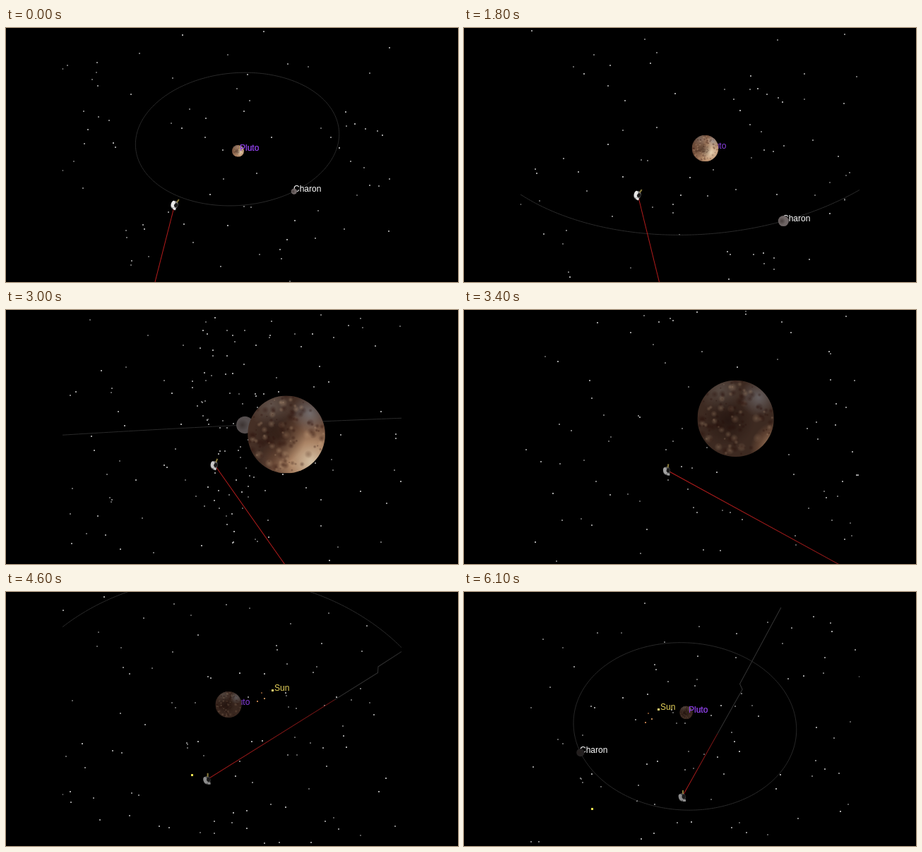
Write an HTML page with a canvas that moves like this. It is 640x360 px and loops after 6200 ms.

```html
<!DOCTYPE html>
<html lang="en">
<head>
<meta charset="utf-8">
<title>Pluto flyby</title>
<style>
html, body { margin: 0; width: 100%; height: 100%; overflow: hidden; background: #000; }
canvas { display: block; }
</style>
</head>
<body>
<canvas id="stage" width="640" height="360"></canvas>
<script>
const ctx = document.getElementById('stage').getContext('2d');
const LOOP = 6200, STEP = 100, TAU = Math.PI * 2;
const WIDTH = 640, HEIGHT = 360, LEFT = 80, RIGHT = 560, FOCAL = 620;

// Space: Pluto sits at the origin with radius 1, the orbit lies in the plane z = 0
const ORBIT_RADIUS = 16.6, CHARON_RADIUS = .55;
const CHARON = [ORBIT_RADIUS, -.33, 0];
const PASS_TIME = 3, PASS_POINT = [-11.2, 2, .5], VELOCITY = [11.4, 11.4, 15.6];
const AIM = [.15, 1.4, 0], UP = [.03, -.05, 1];
const SUN = [-.313, -.602, -.737];

const dot = (a, b) => a[0] * b[0] + a[1] * b[1] + a[2] * b[2];
const add = (a, b, k = 1) => a.map((v, i) => v + b[i] * k);
const unit = a => a.map(v => v / Math.hypot(...a));
const cross = (a, b) => [
  a[1] * b[2] - a[2] * b[1], a[2] * b[0] - a[0] * b[2], a[0] * b[1] - a[1] * b[0]
];

function randomizer(seed) {
  return () => (seed = (seed * 16807) % 2147483647) / 2147483647;
}
const random = randomizer(4242);
const spread = () => random() + random() + random() - 1.5;

function makeStar(direction) {
  return { direction, color: gray(85 + random() * 85) };
}
const stars = [
  ...Array.from({ length: 2800 }, () => {
    const z = random() * 2 - 1, a = random() * TAU, s = Math.sqrt(1 - z * z);
    return makeStar([s * Math.cos(a), s * Math.sin(a), z]);
  }),
  // A dense band behind the closest approach
  ...Array.from({ length: 65 }, () => makeStar(unit([1, -.04 + spread() * .1, -.04 + spread() * .3])))
];

const speckles = Array.from({ length: 130 }, (_, i) => {
  const angle = random() * TAU, reach = Math.sqrt(random());
  return {
    x: Math.cos(angle) * reach, y: Math.sin(angle) * reach,
    r: .025 + random() * .1,
    color: i % 3 ? [45, 14, 8, .4] : [235, 195, 155, .3]
  };
});

function gray(value, tint = 1) {
  return `rgb(${Math.round(value)},${Math.round(value * tint)},${Math.round(value * tint)})`;
}

// Straight flight past Pluto, always looking at the same point
function cameraAt(t) {
  const eye = add(PASS_POINT, VELOCITY, t - PASS_TIME);
  const forward = unit(add(AIM, eye, -1));
  const right = unit(cross(forward, UP)), up = cross(right, forward);
  const look = v => {
    const depth = dot(v, forward), scale = FOCAL / depth;
    return { x: WIDTH / 2 + dot(v, right) * scale, y: HEIGHT / 2 - dot(v, up) * scale, depth, scale };
  };
  return {
    toDirection: look,
    toPoint: p => look(add(p, eye, -1)),
    light: { x: dot(SUN, right), y: -dot(SUN, up), z: -dot(SUN, forward) }
  };
}

// Smooth curve through evenly handled [time, value] keys
function curve(keys, t) {
  const last = keys.length - 1;
  let i = 0;
  while (i < last - 1 && t >= keys[i + 1][0]) i++;
  const slope = k => {
    const a = keys[Math.max(k - 1, 0)], b = keys[Math.min(k + 1, last)];
    return (b[1] - a[1]) / (b[0] - a[0]);
  };
  const h = keys[i + 1][0] - keys[i][0], u = (t - keys[i][0]) / h, v = 1 - u;
  return v * v * (1 + 2 * u) * keys[i][1] + u * u * (1 + 2 * v) * keys[i + 1][1]
    + h * u * v * (v * slope(i) - u * slope(i + 1));
}
const craftX = [[0, 239], [1, 240], [1.8, 246], [3, 295], [3.9, 273], [5.3, 301], [6.1, 309]];
const craftY = [[0, 250], [1.8, 236], [3, 219], [3.9, 244], [5.3, 285], [6.1, 290]];
const pathAngle = [[0, 1.82], [1.8, 1.33], [3, .957], [3.9, -.12], [5.3, -.87], [6.1, -1.06]];

function pixel(p, color, size = 2) {
  if (p.depth < 0) return;
  ctx.fillStyle = color;
  ctx.fillRect(Math.round(p.x) - 1, Math.round(p.y) - 1, size, size);
}

function ellipse(x, y, rx, ry, color, tilt = 0) {
  ctx.beginPath();
  ctx.ellipse(x, y, rx, ry, tilt, 0, TAU);
  ctx.fillStyle = color;
  ctx.fill();
}

function softSpot(x, y, r, [red, green, blue, alpha]) {
  const fade = ctx.createRadialGradient(x, y, 0, x, y, r);
  fade.addColorStop(0, `rgba(${red},${green},${blue},${alpha})`);
  fade.addColorStop(1, `rgba(${red},${green},${blue},0)`);
  ellipse(x, y, r, r, fade);
}

function line(color, points) {
  ctx.beginPath();
  points.forEach(([x, y]) => ctx.lineTo(x, y));
  ctx.strokeStyle = color;
  ctx.stroke();
}

function label(text, x, y, color) {
  ctx.fillStyle = color;
  ctx.fillText(text, Math.round(x), Math.round(y));
}

function drawSky(camera) {
  for (const star of stars) pixel(camera.toDirection(star.direction), star.color);
  const nearSun = (offset, color, size) => pixel(camera.toDirection(add(SUN, offset)), color, size);
  nearSun([.036, .006, -.022], '#b87848');
  nearSun([.02, .008, -.016], '#b88858');
  nearSun([.023, -.005, -.008], '#704828');
  nearSun([.211, .074, -.159], '#e8e050', 3);
  nearSun([0, 0, 0], '#ffe070', 3);
}

function drawOrbit(camera) {
  ctx.beginPath();
  let open = false;
  for (let i = 0; i <= 360; i++) {
    const a = i / 360 * TAU;
    const p = camera.toPoint([Math.cos(a) * ORBIT_RADIUS, Math.sin(a) * ORBIT_RADIUS, 0]);
    const visible = p.depth > .5;
    if (visible) open ? ctx.lineTo(p.x, p.y) : ctx.moveTo(p.x, p.y);
    open = visible;
  }
  ctx.strokeStyle = '#2a2a2a';
  ctx.stroke();
}

function drawCharon(p, phase) {
  if (p.depth < 1) return;
  const r = CHARON_RADIUS * p.scale;
  label('Charon', p.x - 1, p.y, '#fff');
  ellipse(p.x, p.y, r, r, gray(35 + 80 * phase, .92));
  softSpot(p.x - r * .3, p.y, r * .7, [35, 25, 22, .5]);
}

function drawPluto(p, light, phase) {
  const push = (1 + Math.max(0, -light.z) * .8) / (light.z < 0 ? Math.hypot(light.x, light.y) : 1);
  const lx = light.x * push, ly = light.y * push;
  ctx.save();
  ctx.translate(p.x, p.y);
  ctx.scale(p.scale, p.scale);
  ctx.beginPath();
  ctx.arc(0, 0, 1, 0, TAU);
  ctx.clip();
  const surface = ctx.createRadialGradient(lx, ly, 0, lx, ly, .5 + 1.3 * phase);
  surface.addColorStop(0, '#ecd6b6');
  surface.addColorStop(.4, '#bd9270');
  surface.addColorStop(.75, '#74503c');
  surface.addColorStop(1, '#4c3429');
  ctx.fillStyle = surface;
  ctx.fillRect(-1, -1, 2, 2);
  softSpot(.6, -.55, .5, [165, 170, 180, .55]);
  softSpot(-.4, -.75, .6, [150, 145, 140, .4]);
  softSpot(-.2, .05, .7, [28, 12, 8, .6]);
  speckles.forEach(s => softSpot(s.x, s.y, s.r, s.color));
  ctx.fillStyle = `rgba(0,0,0,${.25 * (1 - phase)})`;
  ctx.fillRect(-1, -1, 2, 2);
  ctx.restore();
}

function drawCraft(t, phase) {
  const light = gray(140 + 95 * phase);
  ctx.save();
  ctx.translate(curve(craftX, t), curve(craftY, t));

  // Flown path: red while recent, gray with a small kink beyond
  const reach = t > 4.4 ? 80 + 40 / (t - 4.3) : 500;
  ctx.save();
  ctx.rotate(curve(pathAngle, t));
  line('#333', [[reach, 0], [reach + 72, 0], [reach + 77, -7], [reach + 200, -9]]);
  const fade = ctx.createLinearGradient(0, 0, reach, 0);
  fade.addColorStop(0, '#b81c1c');
  fade.addColorStop(1, phase < .3 ? '#701414' : '#a81818');
  line(fade, [[0, 0], [reach, 0]]);
  ctx.restore();

  ctx.rotate(.6 * phase);
  ellipse(0, 1, 5, 6, gray(70 + 60 * phase));
  ellipse(-2, 1, 3, 5, light, -.4);
  ellipse(2, 0, 2.5, 3, '#181818');
  ctx.fillStyle = light;
  ctx.fillRect(1, 4, 4, 3);
  ctx.fillStyle = '#8a7c3c';
  ctx.fillRect(0, -9, 2, 5);
  ctx.restore();
}

function draw(t) {
  const camera = cameraAt(t), phase = (1 + camera.light.z) / 2;
  const pluto = camera.toPoint([0, 0, 0]), charon = camera.toPoint(CHARON);
  const sun = camera.toDirection(SUN);
  const plutoLabel = () => label('Pluto', pluto.x + 3, pluto.y, '#8a3fe0');

  ctx.fillStyle = '#000';
  ctx.fillRect(0, 0, WIDTH, HEIGHT);
  ctx.save();
  ctx.beginPath();
  ctx.rect(LEFT, 0, RIGHT - LEFT, HEIGHT);
  ctx.clip();
  ctx.font = '12px "Liberation Sans", Arial, sans-serif';
  ctx.lineWidth = 1;

  drawSky(camera);
  drawOrbit(camera);
  if (charon.depth > pluto.depth) drawCharon(charon, phase);
  plutoLabel();
  if (sun.depth > 0) label('Sun', sun.x + 3, sun.y + 1, '#e6d25a');
  drawPluto(pluto, camera.light, phase);
  if (pluto.scale < 10) plutoLabel();
  if (charon.depth <= pluto.depth) drawCharon(charon, phase);
  drawCraft(t, phase);
  ctx.restore();
}

function tick() {
  const elapsed = performance.now() % LOOP;
  draw(Math.floor(elapsed / STEP) * STEP / 1000);
  requestAnimationFrame(tick);
}
tick();
</script>
</body>
</html>
```
